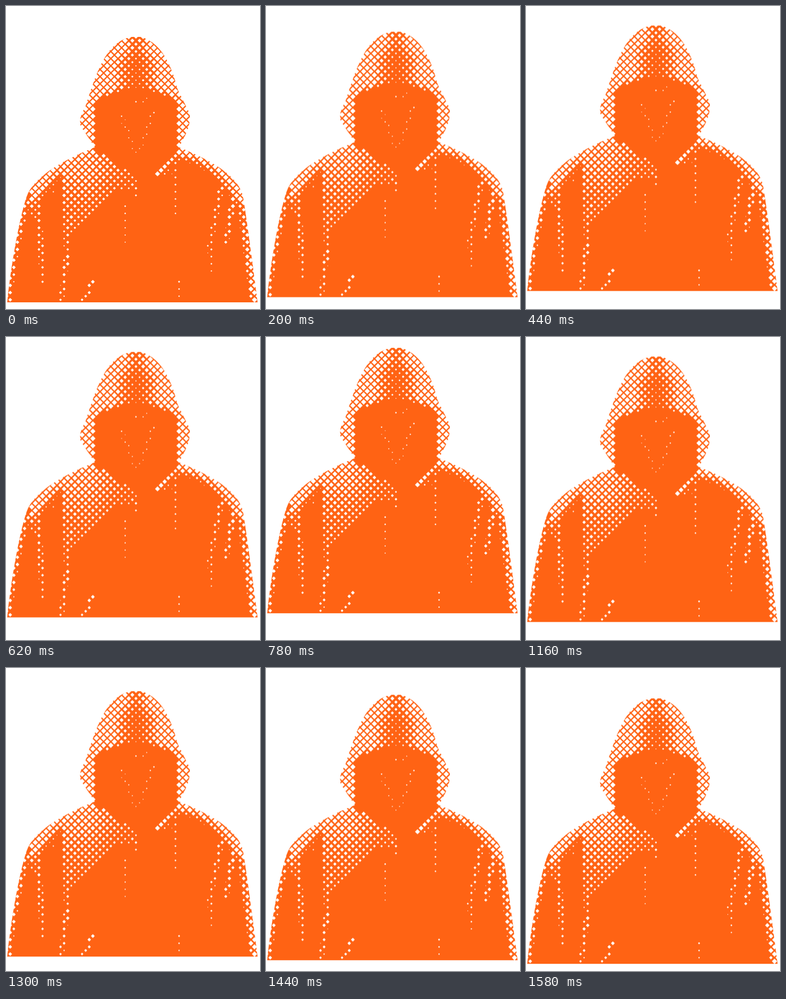
An HTML page for the animation above (1600 ms loop, 420 by 500 pixels).

```html
<!DOCTYPE html>
<html lang="en">
<head>
<meta charset="utf-8">
<title>Hooded figure</title>
<style>
html, body { margin: 0; width: 100%; height: 100%; overflow: hidden; background: #fff; }
svg { display: block; width: 420px; height: 500px; }
</style>
</head>
<body>
<svg viewBox="0 0 420 500">
  <g id="figure">
    <path fill="#ff6314" d="M2 489C8 430 22 350 34 315C46 280 100 252 147 233L124 199Q119 186 131 167C150 110 165 58 208 51H223C262 62 276 108 284 138L303 176Q307 190 297 212L286 233C340 255 385 280 392 315Q398 350 416 489Z"/>
    <path id="holes" fill="#fff"/>
  </g>
</svg>
<script>
const PITCH = 5.94, X0 = 203, Y0 = 395.7;

// Lit folds: [hole size, x, y, x, y]
const folds = [
  [2.8, 44, 312, 46, 348],
  [3.2, 53, 290, 60, 458],
  [2, 78, 276, 79, 304],
  [3.2, 106, 345, 101, 410],
  [3.2, 101, 410, 91, 489],
  [3.2, 143, 454, 127, 489],
  [4, 379, 298, 364, 390],
  [3, 358, 290, 337, 395],
  [2, 337, 395, 340, 440],
  [4.2, 249, 277, 290, 243],
  [1.8, 256, 276, 280, 272],
  [2.2, 281, 246, 281, 344],
  [1.8, 287, 452, 287, 489],
  [1.6, 197, 325, 197, 396],
  [2.6, 211, 290, 215, 316],
  [1.4, 189, 178, 215, 244],
  [1.5, 246, 172, 218, 242],
  [1.5, 214, 157, 236, 155]
];

const clamp = (v, lo, hi) => Math.min(hi, Math.max(lo, v));

function foldSize([size, ax, ay, bx, by], x, y) {
  const dx = bx - ax, dy = by - ay;
  const k = clamp(((x - ax) * dx + (y - ay) * dy) / (dx * dx + dy * dy), 0, 1);
  const d = Math.hypot(x - ax - k * dx, y - ay - k * dy);
  return size * (1 - 0.35 * k) * clamp((5 - d) / 2, 0, 1);
}

function hoodSize(x, y) {
  const side = Math.abs(x - 216), rim = 138 + side * side / 225;
  if (y > rim || side > 92) return 0;
  const top = clamp((95 - y) / 25, 0, 1);
  return clamp(1.1 + side / 11 + top * 1.6, 0, 4.4) * clamp((rim - y) / 9 + 0.35, 0, 1);
}

function shoulderSize(x, y) {
  const dx = Math.max(147 - x, x - 286);
  if (dx < 0 || dx > 110) return 0;
  const depth = (y - 233 - 0.0065 * dx * dx) / Math.hypot(1, 0.013 * dx);
  return 4.4 * clamp((26 - depth) / 14, 0, 1);
}

function sleeveSize(x, y) {
  const up = (489 - y) / 174;
  if (up < 0 || up > 1) return 0;
  const left = x - 2 - 32 * up ** 1.55;
  const right = 416 - 24 * up - x;
  return Math.max(
    3.1 * clamp((10 - left) / 4, 0, 1),
    (4.4 - 1.6 * up) * clamp((13 - right) / 5, 0, 1));
}

function chestSize(x, y) {
  const neck = 238 + (x - 150) * 0.67;
  const hem = 300 + ((216 - x) / 12) ** 2;
  if (x < 92 || x > 216 || y < neck || y > hem) return 0;
  return clamp(4.1 - Math.max(0, x - 135) / 40 - Math.max(0, y - 270) / 45, 1.3, 4.1);
}

let d = "";
for (let j = -60; j <= 16; j++) {
  for (let i = -36; i <= 36; i++) {
    if ((i + j) % 2) continue;
    const x = X0 + i * PITCH, y = Y0 + j * PITCH;
    const areas = [hoodSize, shoulderSize, sleeveSize, chestSize].map(f => f(x, y));
    const r = Math.max(...areas, ...folds.map(f => foldSize(f, x, y)));
    if (r > 0.7) d += `M${x - r} ${y}l${r} ${-r}l${r} ${r}l${-r} ${r}z`;
  }
}
document.getElementById("holes").setAttribute("d", d);

document.getElementById("figure").animate([
  { transform: "translateY(0)", easing: "steps(40, end)" },
  { transform: "translateY(-34px)", easing: "steps(40, end)" },
  { transform: "translateY(0)" }
], { duration: 1600, iterations: Infinity });
</script>
</body>
</html>
```
